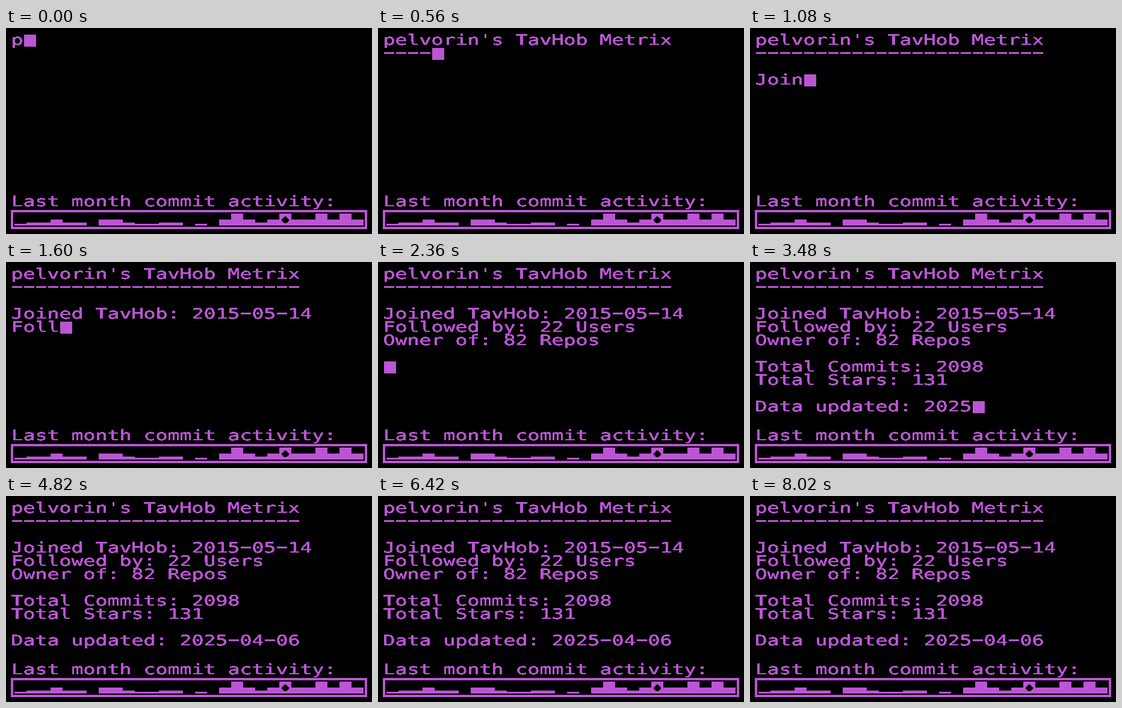
These frames come from a looping animation (608x342 px, 8420 ms). An HTML page:

```html
<!DOCTYPE html>
<html lang="en">
<head>
<meta charset="utf-8">
<title>Terminal stats</title>
<style>
  html, body { margin: 0; width: 100%; height: 100%; overflow: hidden; background: #000; }
  svg { display: block; width: 100vw; height: 100vh; }
  text {
    font: 24px "DejaVu Sans Mono", monospace;
    text-rendering: geometricPrecision;
    fill: #ba55d3; stroke: #ba55d3; stroke-width: .5px;
  }
</style>
</head>
<body>
<svg viewBox="0 0 608 342">
  <defs>
    <!-- hard edges, as on an old terminal -->
    <filter id="crisp" filterUnits="userSpaceOnUse" x="0" y="0" width="608" height="342"
            color-interpolation-filters="sRGB">
      <feComponentTransfer><feFuncA type="discrete" tableValues="0 1"/></feComponentTransfer>
    </filter>
  </defs>
  <rect width="608" height="342"/>
  <g filter="url(#crisp)"><g id="type"></g></g>
  <g fill="#ba55d3" shape-rendering="crispEdges">
    <rect x="10" y="304" width="588" height="28" fill="none" stroke="#ba55d3" stroke-width="4"/>
    <path id="bars"/>
    <path d="M462 313h4v2h2v2h2v4h-2v2h-2v1h-4v-1h-2v-2h-2v-4h2v-2h2z" fill="#000"/>
    <rect id="cursor" width="20" height="20"/>
  </g>
</svg>
<script>
const LOOP = 8420, TICK = 20, BLINK = 400;
const CELL = 20, LINE = 22, LEFT = 10, TOP = 11;
const ASPECT = 1.384;  // wide terminal pixels
const DASH = "\u2212";

const script = [
  "pelvorin's TavHob Metrix",
  "-".repeat(24),
  "",
  "Joined TavHob: 2015-05-14",
  "Followed by: 22 Users",
  "Owner of: 82 Repos",
  "",
  "Total Commits: 2098",
  "Total Stars: 131",
  "",
  "Data updated: 2025-04-06"
].join("\n").replaceAll("-", DASH);
const typingEnd = (script.length) * TICK;

const type = document.getElementById("type");
const cursor = document.getElementById("cursor");
type.setAttribute("transform", `translate(${LEFT - 1.5} 0) scale(${ASPECT} 1)`);

// One text line, each character on its terminal column
function addLine(str, top) {
  const el = document.createElementNS("http://www.w3.org/2000/svg", "text");
  const chars = [...str], base = top + 17;
  el.setAttribute("x", chars.map((c, i) => i * CELL / ASPECT).join(" ") || 0);
  el.setAttribute("y", chars.map(c => c === DASH ? base - 1.5 : base).join(" ") || base);
  el.textContent = str;
  type.append(el);
  return el;
}

const rows = script.split("\n").map((s, i) => addLine(s, TOP + i * LINE));
addLine("Last month commit activity:", 279);

// Daily activity levels, 0 to 4
const heights = [0, 3, 5, 10, 20];
document.getElementById("bars").setAttribute("d",
  [..."12232203321122010343234334343"].map((level, i) => {
    const h = heights[level];
    return h ? `M${14 + i * CELL} 328v${-h}h${CELL}v${h}z` : "";
  }).join(""));

let shown = -1;
function render(t) {
  const count = Math.min(Math.floor(t / TICK) + 1, script.length);
  if (count !== shown) {
    shown = count;
    const typed = script.slice(0, count).split("\n");
    rows.forEach((el, i) => { el.textContent = typed[i] || ""; });
    cursor.setAttribute("x", LEFT + typed.at(-1).length * CELL);
    cursor.setAttribute("y", TOP + (typed.length - 1) * LINE);
  }
  const off = t >= typingEnd && Math.floor((t - typingEnd) / BLINK) % 2 === 1;
  cursor.setAttribute("visibility", off ? "hidden" : "visible");
}

const start = performance.now();
function frame() {
  render((performance.now() - start) % LOOP);
  requestAnimationFrame(frame);
}
render(0);
requestAnimationFrame(frame);
</script>
</body>
</html>
```
